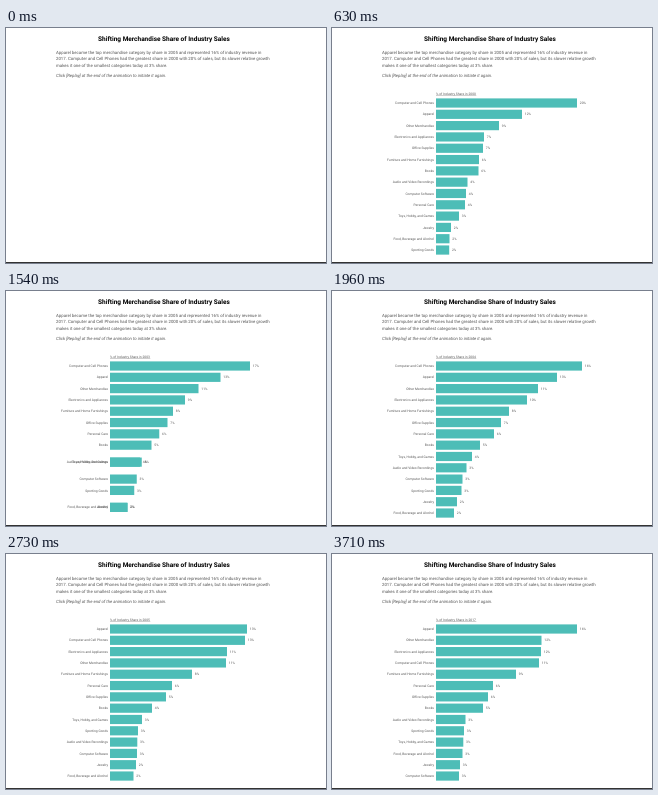
An HTML page that plays this animation: 320 px wide and 235 px high, repeating every 3.78 s.

```html
<!DOCTYPE html>
<html lang="en">
<head>
<meta charset="utf-8">
<title>Shifting Merchandise Share of Industry Sales</title>
<style>
  html, body { margin: 0; width: 100%; height: 100%; overflow: hidden; background: #fff; }
  svg { display: block; width: 100vw; height: 100vh; }
  text { font: 3.3px Roboto, sans-serif; fill: #555; text-rendering: geometricPrecision; }
  .title { font-size: 6.49px; font-weight: 700; fill: #000; text-anchor: middle; }
  .intro { font-size: 4.32px; }
  .name { text-anchor: end; }
  .bar { fill: #4dbdb7; }
</style>
</head>
<body>
<svg viewBox="0 0 320 235">
  <text class="title" x="158" y="13">Shifting Merchandise Share of Industry Sales</text>
  <text class="intro" x="50" y="25.6">Apparel became the top merchandise category by share in 2005 and represented 16% of industry revenue in</text>
  <text class="intro" x="50" y="32.1">2017. Computer and Cell Phones had the greatest share in 2000 with 20% of sales, but its slower relative growth</text>
  <text class="intro" x="50" y="38.5">makes it one of the smallest categories today at 3% share.</text>
  <text class="intro" x="50" y="49" font-style="italic" style="font-style:italic">Click [Replay] at the end of the animation to initiate it again.</text>
  <g id="chart">
    <text id="year" x="104" y="67"></text>
    <rect x="104" y="67.4" width="40.3" height=".35" fill="#777"/>
  </g>
  <rect y="234" width="320" height="1" fill="#333"/>
</svg>
<script>
const LOOP = 3780, STEP = 70, LEFT = 104, TOP = 75, ROW = 11.31, BAR = 9.2;

// Bar lengths in each of six key years
const categories = [
  ['Computer and Cell Phones', 141, 134, 146, 140, 135, 103],
  ['Apparel', 86, 100, 121, 123, 137, 141],
  ['Other Merchandise', 63, 75, 102, 105.5, 116, 105.5],
  ['Electronics and Appliances', 48, 59, 91, 23, 117, 105],
  ['Office Supplies', 47, 50, 65, 91, 56, 52],
  ['Furniture and Home Furnishings', 43, 53, 73, 71, 82, 80],
  ['Books', 42.5, 39, 44, 40, 42, 47],
  ['Audio and Video Recordings', 31.5, 29.5, 30.5, 26, 27.3, 29.5],
  ['Computer Software', 30, 27, 26.5, 25.5, 27, 23],
  ['Personal Care', 29, 40.5, 58, 63, 62, 57],
  ['Toys, Hobby, and Games', 23, 27.5, 36, 30.5, 32, 27.3],
  ['Jewelry', 15, 14.5, 21, 20, 26, 24],
  ['Food, Beverage and Alcohol', 13.5, 16, 18, 18, 23.5, 26.5],
  ['Sporting Goods', 13.2, 23, 25.5, 25, 28, 28]
];
const perPercent = [7.05, 7.44, 9.1, 9.3, 10.5, 9];
const years = [2000, 2002, 2003, 2004, 2005, 2008, 2017];
const moves = [[840, 1120], [1400, 1680], [1960, 2170], [2450, 2730], [3010, 3220], [3500, 3710]];

const mix = (a, b, p) => a + (b - a) * p;
const clamp = v => Math.min(1, Math.max(0, v));
const easeOut = p => 1 - (1 - p) ** 3;
const easeInOut = p => p < .5 ? 4 * p ** 3 : 1 - 4 * (1 - p) ** 3;

function makeState(widths, scale) {
  const order = widths.map((_, i) => i).sort((a, b) => widths[b] - widths[a]);
  return { widths, scale, ranks: widths.map((_, i) => order.indexOf(i)) };
}
const states = perPercent.map((scale, k) => makeState(categories.map(c => c[k + 1]), scale));
// The year before the last lies halfway between its neighbours
const [before, last] = states.slice(-2);
states.splice(5, 0, makeState(
  before.widths.map((w, i) => mix(w, last.widths[i], .5)), mix(before.scale, last.scale, .5)));

const chart = document.getElementById('chart');
const yearLabel = document.getElementById('year');

function add(tag, className, x) {
  const el = document.createElementNS('http://www.w3.org/2000/svg', tag);
  el.setAttribute('class', className);
  el.setAttribute('x', x);
  return chart.appendChild(el);
}
const rows = categories.map(([label]) => {
  const row = { name: add('text', 'name', 102), bar: add('rect', 'bar', LEFT), value: add('text', '', 0) };
  row.name.textContent = label;
  row.bar.setAttribute('height', BAR);
  return row;
});

function draw(time) {
  const t = Math.floor(time % LOOP / STEP) * STEP;
  const k = moves.filter(([start]) => t >= start).length;
  const to = states[k], from = states[Math.max(0, k - 1)];
  const [start, end] = k ? moves[k - 1] : [0, 1];
  const p = easeInOut(clamp((t - start) / (end - start)));
  const grow = easeOut(clamp(t / 630));

  chart.setAttribute('visibility', t ? 'visible' : 'hidden');
  yearLabel.textContent = '% of Industry Share in ' + years[k];
  const scale = mix(from.scale, to.scale, p);
  rows.forEach(({ name, bar, value }, i) => {
    const width = mix(from.widths[i], to.widths[i], p) * grow;
    const y = TOP + ROW * mix(from.ranks[i], to.ranks[i], p);
    name.setAttribute('y', y + 1.1);
    bar.setAttribute('y', y - BAR / 2);
    bar.setAttribute('width', width);
    value.setAttribute('x', LEFT + width + 2.8);
    value.setAttribute('y', y + 1.1);
    value.textContent = Math.round(width / scale) + '%';
  });
}

const begin = performance.now();
function frame() {
  draw(performance.now() - begin);
  requestAnimationFrame(frame);
}
frame();
</script>
</body>
</html>
```
